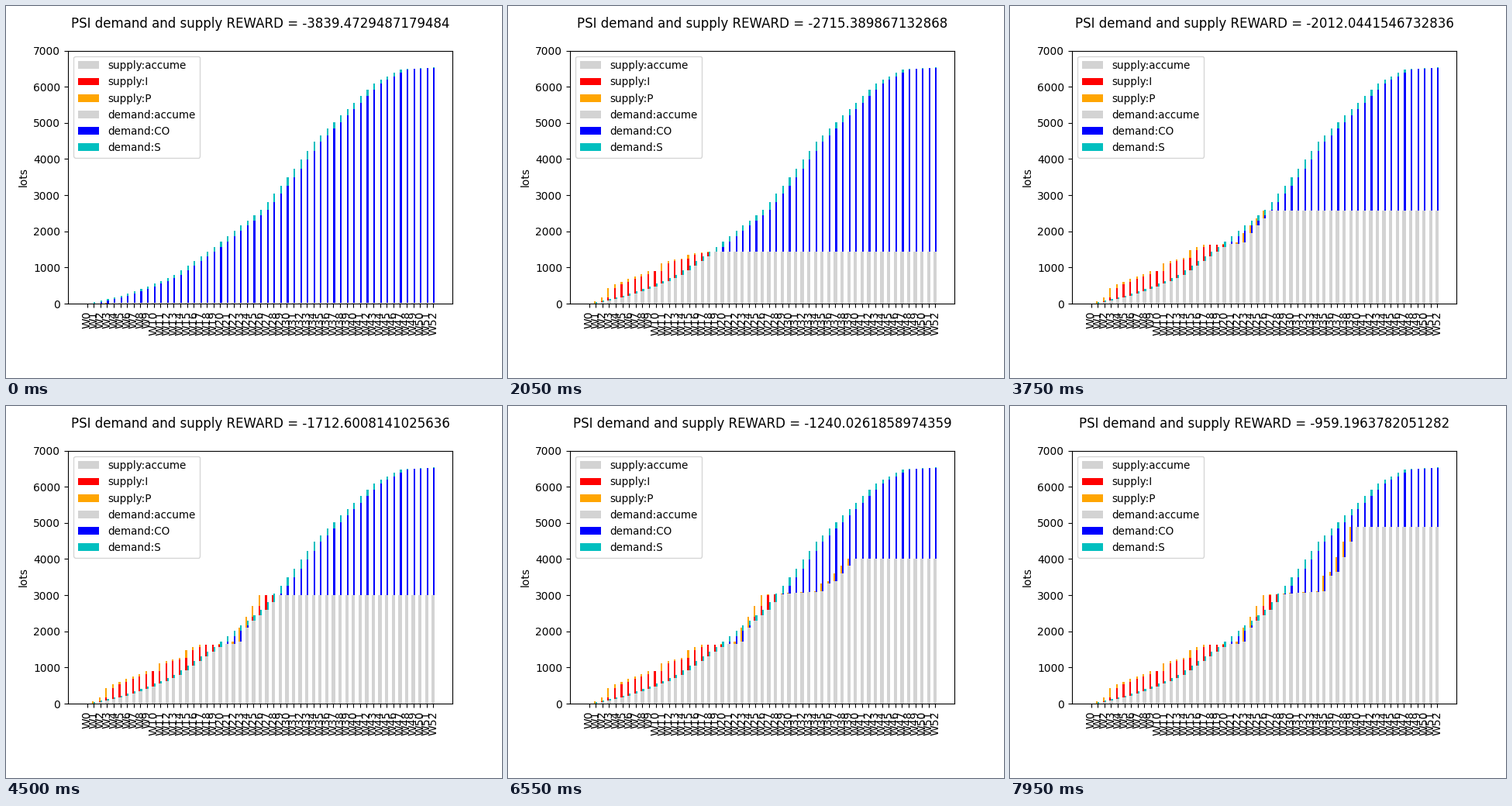
A matplotlib script for the animation above (8000 ms loop, 640 by 480 pixels).

```python
import numpy as np
import matplotlib.pyplot as plt
from matplotlib.animation import FuncAnimation
from matplotlib.collections import PolyCollection
from matplotlib.patches import Patch

STEP = 50
FRAMES = 160
WEEKS = 53
BAR = 0.25

plt.rcParams["font.family"] = "DejaVu Sans"

week = np.arange(WEEKS)


def curve(*points):
    """Weekly totals on straight lines between (week, lots) points."""
    return np.interp(week, *zip(*points))


DEMAND = curve((0, 0), (5, 205), (9, 470), (13, 790), (18, 1430), (26, 2595),
               (30, 3495), (34, 4480), (39, 5390), (43, 6090), (47, 6480),
               (52, 6540))
SUPPLY = curve((0, 0), (1, 55), (2, 175), (3, 430), (4, 540), (8, 816),
               (9, 900), (10, 910), (11, 1120), (14, 1270), (15, 1490),
               (17, 1630), (21, 1650), (22, 1720), (23, 2110), (26, 3005),
               (27, 3020), (34, 3110), (35, 3540), (36, 3640), (39, 4900))

# weeks are planned block by block; each block fills evenly over its time
BLOCK_WEEK = [1, 5, 9, 14, 22, 27, 35]
BLOCK_MS = np.array([-50, 850, 1300, 1800, 2300, 4450, 5100, 7950])
block = np.clip(np.searchsorted(BLOCK_WEEK, week, side="right") - 1, 0, None)

REWARD_MS = [0, 1300, 2950, 4500, 5550, 6550, 7950]
REWARD = [-3839.4729487179484, -3035.3394358974365, -2331.4503846153852,
          -1712.6008141025636, -1443.624262820513, -1240.0261858974359,
          -959.1963782051282]


def supply(ms):
    done = np.clip((ms - BLOCK_MS[:-1]) / np.diff(BLOCK_MS), 0, 1)
    return np.cumsum(np.diff(SUPPLY, prepend=0) * done[block])


def previous(total):
    return np.concatenate(([0], total[:-1]))


def rects(left, low, high):
    """Rectangles of one bar width, as an (N, 4, 2) array."""
    right = left + BAR
    xs = np.stack([left, right, right, left], axis=1)
    ys = np.stack([low, low, high, high], axis=1)
    return np.stack([xs, ys], axis=2)


fig, ax = plt.subplots(figsize=(6.4, 4.8), dpi=100)
fig.subplots_adjust(bottom=0.2)

margin = 0.05 * (WEEKS - 1 + 2 * BAR)
ax.set_xlim(-BAR - margin, WEEKS - 1 + BAR + margin)
ax.set_ylim(0, 7000)
ax.set_xticks(week, [f"W{w}" for w in week], rotation=90)
ax.set_ylabel("lots")
title = ax.set_title("", pad=21.3)

COLORS = {
    "supply:accume": "lightgray",
    "supply:I": "red",
    "supply:P": "orange",
    "demand:accume": "lightgray",
    "demand:CO": "blue",
    "demand:S": "c",
}
bars = {}
for name, color in COLORS.items():
    bars[name] = PolyCollection([], facecolors=color, edgecolors="none")
    ax.add_collection(bars[name], autolim=False)
legend = ax.legend(handles=[Patch(color=c, label=n, linewidth=0)
                            for n, c in COLORS.items()],
                   loc="upper left", labelspacing=0.52)
for text in legend.get_texts():
    text.set_fontsize(9.75)


def draw(frame):
    ms = frame * STEP
    made = supply(ms)
    made_before, sold_before = previous(made), previous(DEMAND)
    base = np.minimum(made_before, sold_before)
    for side, left, names, before, now in (
            ("supply", week - BAR, ("I", "P"), made_before, made),
            ("demand", week, ("CO", "S"), sold_before, DEMAND)):
        bars[f"{side}:accume"].set_verts(rects(left, 0 * base, base))
        bars[f"{side}:{names[0]}"].set_verts(rects(left, base, before))
        bars[f"{side}:{names[1]}"].set_verts(rects(left, before, now))
    reward = float(np.interp(ms, REWARD_MS, REWARD))
    title.set_text(f"PSI demand and supply REWARD = {reward!r}")
    return [title, *bars.values()]


anim = FuncAnimation(fig, draw, frames=FRAMES, interval=STEP, repeat=True,
                     repeat_delay=0, blit=False)
plt.show()
```
